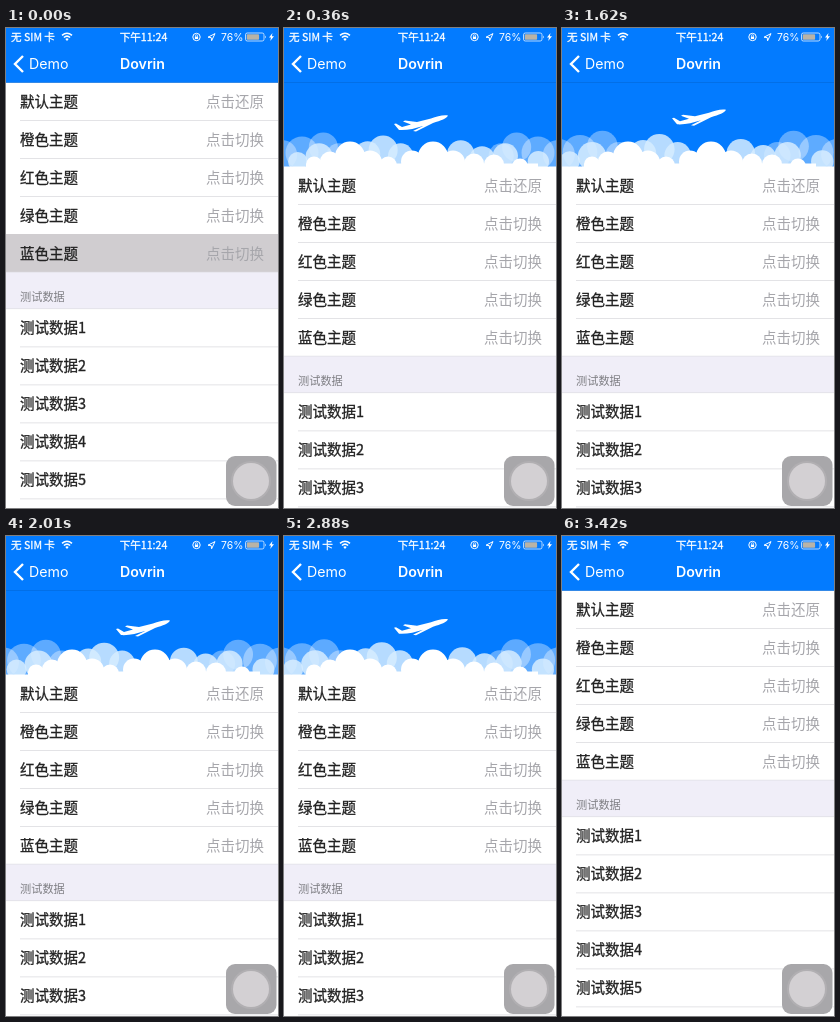
These frames come from a looping animation (272x480 px, 3450 ms). An HTML page:

```html
<!DOCTYPE html>
<html lang="zh-CN">
<head>
<meta charset="utf-8">
<title>下拉刷新</title>
<style>
html, body { margin: 0; width: 100%; height: 100%; overflow: hidden; background: #037bff; }
svg { display: block; width: 272px; height: 480px; }
text { font-family: "Noto Sans CJK SC", "Noto Sans CJK", "Noto Sans CJK JP", sans-serif; }
.latin { font-family: Inter, Roboto, sans-serif; }
</style>
</head>
<body>
<svg id="stage" viewBox="0 0 272 480" xmlns="http://www.w3.org/2000/svg"></svg>
<script>
const LOOP = 3450, OPEN = 84, TOP = 54.5, ROW = 38, BLUE = '#037bff', RULE = '#dcdce0';
const stage = document.getElementById('stage');

function add(parent, tag, attrs = {}, text) {
  const el = document.createElementNS(stage.namespaceURI, tag);
  for (const k in attrs) el.setAttribute(k, attrs[k]);
  if (text) el.textContent = text;
  parent.append(el);
  return el;
}
const group = parent => add(parent, 'g');
const rect = (parent, x, y, width, height, fill, rx = 0) =>
  add(parent, 'rect', { x, y, width, height, fill, rx });
const label = (parent, text, x, y, size, fill, more = {}) =>
  add(parent, 'text', { x, y, 'font-size': size, fill, ...more }, text);
const path = (parent, d, more = {}) => add(parent, 'path', { d, fill: '#fff', ...more });
const line = { fill: 'none', stroke: '#fff' };
const medium = color => ({ stroke: color, 'stroke-width': 0.3 });

function puffs(parent, fill, opacity, list) {
  const g = add(parent, 'g', { fill, 'fill-opacity': opacity });
  for (const [cx, cy, r] of list) add(g, 'circle', { cx, cy, r });
  return g;
}

// Sky, drawn upwards from the top edge of the list
rect(stage, 0, 0, 272, 480, BLUE);
const sky = group(stage);
const side = [[-22, -20, 15], [0, -14, 17], [-38, -11, 13], [20, -12, 15], [42, -12, 16], [58, -8, 13]];
const right = puffs(sky, '#fff', 0.36, side);
const left = puffs(sky, '#fff', 0.36, side.map(([x, y, r]) => [-x, y, r]));
const pale = puffs(sky, '#d6ecff', 0.85, [[10, -5, 10], [32, -10, 14], [82, -13, 13], [98, -17, 15],
  [116, -11, 13], [178, -13, 14], [200, -8, 13], [224, -11, 13], [258, -5, 11]]);
const front = puffs(sky, '#fff', 1, [[30, -2, 8], [46, -5, 10], [66, -10, 15], [86, -4, 12], [104, -1, 9],
  [128, -5, 11], [149, -10, 15], [169, -4, 12], [190, -3, 10], [210, -2, 10], [236, 0, 8]]);
rect(front, 22, -3, 232, 4, '#fff');
const plane = path(sky, 'M27-8C22-9 16-7 10-5L-4-1.5-16-3-18-2-10 1-19 3.5-25 0-27 .5-22 6.5' +
  'C-14 7-6 5 2 2.5L-8 7.5-5 8 12-.5C20-3 26-5 27-8Z');

// List
const list = group(stage);
rect(list, 0, 0, 272, 520, '#fff');
let pressed;
['默认', '橙色', '红色', '绿色', '蓝色'].forEach((name, i) => {
  const y = i * ROW;
  if (i === 4) pressed = rect(list, 0, y - 0.5, 272, ROW, '#d0cdd0');
  label(list, name + '主题', 14, y + 24, 14.5, '#222', medium('#222'));
  label(list, i ? '点击切换' : '点击还原', 258, y + 24, 14.5, '#a6a6ab', { 'text-anchor': 'end' });
  if (i < 4) rect(list, 14, y + 37.5, 258, 0.8, RULE);
});
rect(list, 0, 189.5, 272, 37, '#f0eef8');
rect(list, 0, 189.3, 272, 0.6, RULE);
rect(list, 0, 226, 272, 0.6, RULE);
label(list, '测试数据', 14, 218, 11.2, '#7d7d82');
for (let i = 1; i <= 6; i++) {
  const y = 188.5 + i * ROW;
  label(list, '测试数据' + i, 14, y + 24, 14.5, '#222', medium('#222'));
  rect(list, 14, y + 37.5, 258, 0.8, RULE);
}

// Status and navigation bars
rect(stage, 0, 0, 272, 54, BLUE);
rect(stage, 0, 54, 272, 0.6, '#0268d8');
label(stage, '无 SIM 卡', 5, 13, 10.6, '#fff', medium('#fff'));
path(stage, 'M56 7.4Q61 3 66 7.4M57.9 9.5Q61 6.8 64.1 9.5', { ...line, 'stroke-width': 1.5 });
path(stage, 'M59.3 11Q61 9.6 62.7 11L61 13Z');
label(stage, '下午11:24', 137.5, 13, 10.6, '#fff', { 'text-anchor': 'middle', ...medium('#fff') });
add(stage, 'circle', { cx: 190.5, cy: 9, r: 3.7, ...line, 'stroke-width': 1 });
rect(stage, 188.9, 8.6, 3.2, 2.4, '#fff');
path(stage, 'M189.5 8.8V7.7a1 1 0 0 1 2 0V8.8', { ...line, 'stroke-width': 0.7 });
path(stage, 'M202 9.2L209 5.6 205.6 12.8 205.2 9.6Z', { ...line, 'stroke-width': 1 });
label(stage, '76%', 215, 12.8, 10.4, '#fff', { class: 'latin' });
add(stage, 'rect', { x: 239.5, y: 5, width: 18.5, height: 8, rx: 1.8, ...line, 'stroke-width': 0.7 });
rect(stage, 240.7, 6.2, 12.4, 5.6, '#b9b3a6', 0.8);
path(stage, 'M259 7.4q1.6 1.6 0 3.2Z');
path(stage, 'M266.5 5L263 9.6H265L264.2 13 268 8.2H265.8Z');
path(stage, 'M17 28L9 36 17 44', { ...line, 'stroke-width': 2.4 });
label(stage, 'Demo', 23, 41, 14.2, '#fff', { class: 'latin' });
label(stage, 'Dovrin', 136.5, 41, 14.2, '#fff',
  { class: 'latin', 'text-anchor': 'middle', 'font-weight': 600 });

// Floating button
rect(stage, 220, 428, 50.5, 50, '#a8a7aa', 9);
add(stage, 'circle', { cx: 245, cy: 453, r: 20, fill: '#b1afb2' });
add(stage, 'circle', { cx: 245, cy: 453, r: 18, fill: '#d3d0d3' });

const clamp = x => Math.min(1, Math.max(0, x));
const ease = x => (1 - Math.cos(Math.PI * clamp(x))) / 2;
const move = (el, x, y, s = 1) => el.setAttribute('transform', `translate(${x} ${y}) scale(${s})`);

function draw(t) {
  const closing = ease((t - 2963) / 400);
  const p = ease(t / 330) - closing;
  const bob = Math.cos((t - 360) / 930 * 2 * Math.PI);
  const rest = 1 - p;
  const edge = TOP + OPEN * p;

  move(list, 0, edge);
  pressed.setAttribute('opacity', 1 - clamp((t - 40) / 300));
  sky.setAttribute('visibility', p > 0.01 ? 'visible' : 'hidden');
  move(sky, 0, edge);

  const swell = p * (1 - 0.03 * bob);
  move(left, 18 + 170 * rest, 0, swell);
  move(right, 254 - 170 * rest, 0, swell);
  move(pale, 136 * (1 - swell), 0, swell);
  move(front, 136 * rest, 0, p);

  if (closing > 0) move(plane, 137 + 400 * closing, -46.5 + 3.5 * bob - 60 * closing);
  else move(plane, 137 * p, -46.5 + 3.5 * bob + 40 * rest);
}

function tick(now) {
  draw(now % LOOP);
  requestAnimationFrame(tick);
}
draw(0);
requestAnimationFrame(tick);
</script>
</body>
</html>
```
